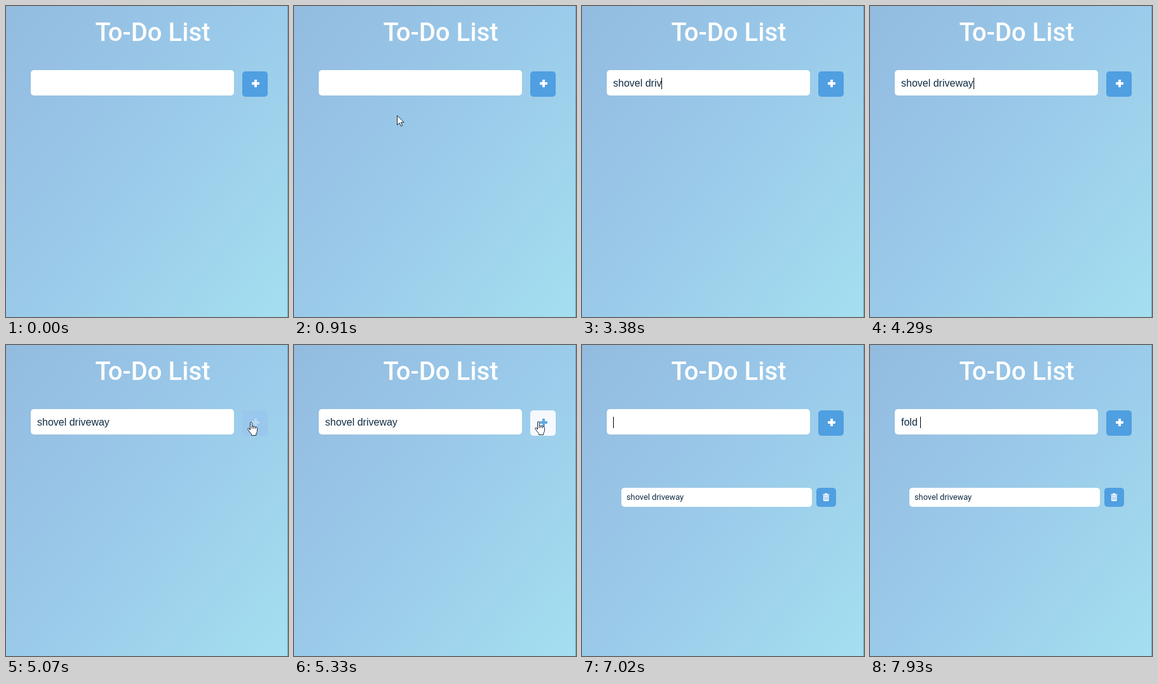
An HTML page that plays this animation: 444x490 px, repeating every 8000 ms.

```html
<!DOCTYPE html>
<html lang="en">
<head>
<meta charset="utf-8">
<title>To-Do List</title>
<style>
  html, body { margin: 0; width: 100%; height: 100%; overflow: hidden; }
  body {
    position: relative;
    background: linear-gradient(128deg, #93bbe0, #9ac9e9 46%, #a4dff0);
    font-family: Roboto, sans-serif;
    color: #0f2c44;
  }
  body > * { position: absolute; box-sizing: border-box; }
  .edge { right: 0; top: 0; width: 1px; height: 100%; background: #6f9fb9; }
  h1 {
    left: 31px; top: 18px; width: 400px; margin: 0;
    font-size: 40px; font-weight: 500; line-height: 48px;
    text-align: center; color: #fff;
  }
  .field {
    left: 39px; top: 101px; width: 320px; height: 40px; padding-left: 10px;
    border-radius: 5px; background: #fff; white-space: pre;
    font: 16px/41px "Liberation Sans", Arial, sans-serif;
  }
  .caret {
    display: inline-block; width: 1px; height: 18px; margin-right: -1px;
    vertical-align: -4px; background: #000;
  }
  .item {
    left: 62px; top: 225px; width: 300px; height: 30px; padding-left: 8px;
    border-radius: 5px; background: #fff; font-size: 12.8px; line-height: 30px;
  }
  .btn { border-radius: 5px; background: #4f9fe1; color: #fff; }
  .btn svg { display: block; width: 100%; height: 100%; fill: currentColor; }
  #add { left: 372px; top: 103px; width: 40px; height: 40px; }
  #del { left: 369px; top: 225px; width: 30.5px; height: 30px; }
  .cursor { left: 0; top: 0; overflow: visible; }
  .cursor path { fill: #fff; stroke: #1c2833; stroke-width: 1; stroke-linejoin: round; }
</style>
</head>
<body>
  <div class="edge"></div>
  <h1>To-Do List</h1>
  <div class="field"><span id="typed"></span><span class="caret" id="caret"></span></div>
  <div class="btn" id="add">
    <svg viewBox="0 0 40 40">
      <path d="M19.8 13h2.4q.8 0 .8.8V17h3.2q.8 0 .8.8v2.4q0 .8-.8.8H23v3.2q0 .8-.8.8h-2.4q-.8 0-.8-.8V21h-3.2q-.8 0-.8-.8v-2.4q0-.8.8-.8H19v-3.2q0-.8.8-.8z"/>
    </svg>
  </div>
  <div class="item" id="item">shovel driveway</div>
  <div class="btn" id="del">
    <svg viewBox="0 0 30 30">
      <path fill-rule="evenodd" d="M10 10h2.8l.8-1.5h2.8l.8 1.5H20v1.5H10zM10.7 12.2h8.6v7.6q0 1.2-1.2 1.2h-6.2q-1.2 0-1.2-1.2zM12.4 13.6v6h.8v-6zm2.2 0v6h.8v-6zm2.2 0v6h.8v-6z"/>
    </svg>
  </div>
  <svg class="cursor" id="arrow" width="14" height="20">
    <path d="M.5.5V15.5L4 12.2 6.4 17.4 8.6 16.4 6.3 11.3H11z"/>
  </svg>
  <svg class="cursor" id="hand" width="18" height="23">
    <path d="M4.5 13V2Q4.5.5 5.8.5T7.2 2V7.5Q8.5 6.3 9.9 7.7 11.3 6.8 12.6 8.2 15.5 7.5 15.5 10.5V14.5Q15.5 17 13.7 19V21.5H6.5V19.5Q3.5 16 1 12.3.1 10.6 1.6 10.2 3 10 4.5 13z"/>
    <path d="M7.2 7.5V11M9.9 7.7V11M12.6 8.2V11"/>
  </svg>
<script>
const LOOP = 8000, TICK = 130;
const $ = id => document.getElementById(id);
const [typed, caret, add, item, del, arrow, hand] =
  ['typed', 'caret', 'add', 'item', 'del', 'arrow', 'hand'].map($);

// Each entry is the tick of one keystroke.
const drafts = [
  { text: 'shovel driveway', keys: [13, 14, 16, 17, 18, 19, 20, 21, 23, 24, 26, 27, 28, 30, 32], end: 42 },
  { text: 'fold ', keys: [58, 59, 60, 60, 61], end: 62 }
];
const carets = [[9, 37], [54, 62]];
const added = 42;
const arrowPath = [[7, 162, 172]];
const handPath = [[38, 376, 125], [39, 380, 121], [40, 379, 120], [42, 379, 120]];
const handGone = 43;

const normal = { backgroundColor: '#4f9fe1', color: '#fff' };
const hover = { backgroundColor: '#fafcfe', color: '#5aa5e2' };
const fade = add.animate([
  { ...normal, offset: 0 },
  { ...normal, offset: 4940 / LOOP, easing: 'ease' },
  { ...hover, offset: 5440 / LOOP },
  { ...hover, offset: 5590 / LOOP, easing: 'ease' },
  { ...normal, offset: 6090 / LOOP },
  { ...normal, offset: 1 }
], { duration: LOOP, fill: 'both' });
fade.pause();

const show = (el, on) => { el.style.visibility = on ? 'visible' : 'hidden'; };

function place(el, path, end, tick) {
  const step = path.filter(p => p[0] <= tick).pop();
  show(el, step && tick < end);
  if (step) el.style.transform = `translate(${step[1]}px, ${step[2]}px)`;
}

function draw(time) {
  const tick = Math.floor(time / TICK);
  const draft = drafts.find(d => tick < d.end);
  typed.textContent = draft
    ? draft.text.slice(0, draft.keys.filter(k => k <= tick).length) : '';
  show(caret, carets.some(([from, to]) => tick >= from && tick < to));
  show(item, tick >= added);
  show(del, tick >= added);
  place(arrow, arrowPath, 8, tick);
  place(hand, handPath, handGone, tick);
  fade.currentTime = tick * TICK;
}

let start;
function frame(now) {
  start ??= now;
  draw((now - start) % LOOP);
  requestAnimationFrame(frame);
}
draw(0);
requestAnimationFrame(frame);
</script>
</body>
</html>
```
